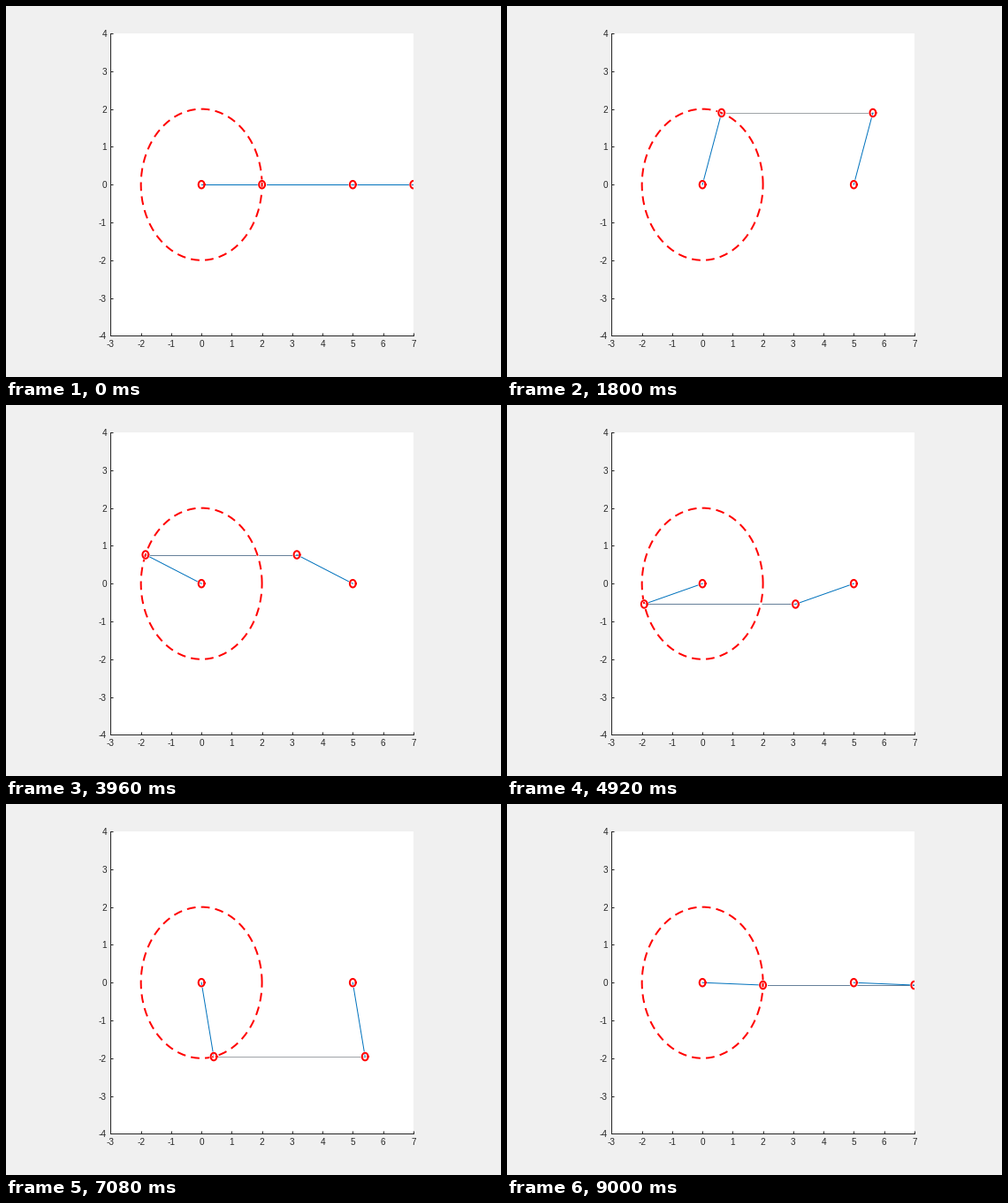
Recreate the animation shown at these times as a matplotlib script. Size 560x420 px, loop 9120 ms.

```python
import numpy as np
import matplotlib.pyplot as plt
from matplotlib.animation import FuncAnimation

W, H = 560, 420
PX = 0.72                     # points per pixel at 100 dpi
FRAMES, INTERVAL = 76, 120
STEP = 1 / 12                 # crank angle per frame, radians
CRANK, BASE, JOINT = 2, 5, 0.1
BLUE, STEEL, GRAY = "#0072bd", "#66809a", "#a0a4a8"
INK = "#262626"

plt.rcParams.update({
    "font.family": "Liberation Sans",
    "font.size": 10 * PX,
    "axes.unicode_minus": False,
    "toolbar": "None",
})

fig = plt.figure(figsize=(W / 100, H / 100), dpi=100, facecolor="#f0f0f0")
left, bottom, side = 118.4, 46.6, 342.4
ax = fig.add_axes([left / W, bottom / H, side / W, side / H])
ax.set(xlim=(-3, 7), ylim=(-4, 4), xticks=range(-3, 8), yticks=range(-4, 5))
ax.set_xticklabels([str(v) for v in range(-3, 8)])
ax.set_yticklabels([str(v) for v in range(-4, 5)])
ax.tick_params(direction="in", length=3.4 * PX, width=PX, color=INK,
               labelcolor=INK)
ax.tick_params(axis="x", pad=5 * PX)
ax.tick_params(axis="y", pad=4.5 * PX)
for name, spine in ax.spines.items():
    spine.set(linewidth=PX, color=INK, visible=name in ("left", "bottom"))

turn = np.linspace(0, 2 * np.pi, 181)


def ring_points(x, y, r):
    return x + r * np.cos(turn), y + r * np.sin(turn)


def ring(x, y, r, z, style="-"):
    """Red circle on a slightly wider white one."""
    pts = ring_points(x, y, r)
    back, = ax.plot(*pts, color="white", lw=3 * PX, zorder=z)
    front, = ax.plot(*pts, color="red", lw=2 * PX, ls=style, zorder=z + 0.1,
                     dash_capstyle="butt")
    return back, front


def link():
    return ax.plot([], [], color=BLUE, lw=PX, zorder=2)[0]


crank, coupler, rocker = link(), link(), link()
# Agg rounds dashes to whole pixels plus a half: 9.5 on, 6.5 off
ring(0, 0, CRANK, 3, (0, (4.9, 3.1)))
ring(0, 0, JOINT, 4)
ring(BASE, 0, JOINT, 4)
pins = [ring(CRANK, 0, JOINT, 4), ring(CRANK + BASE, 0, JOINT, 4)]


def coupler_color(x, y):
    if y == 0:
        return BLUE
    return GRAY if x > 0 and abs(y) > 0.6 else STEEL


def update(i):
    a = i * STEP
    x, y = CRANK * np.cos(a), CRANK * np.sin(a)
    crank.set_data([0, x], [0, y])
    coupler.set_data([x, x + BASE], [y, y])
    coupler.set_color(coupler_color(x, y))
    rocker.set_data([BASE, BASE + x], [0, y])
    for pin, px in zip(pins, (x, x + BASE)):
        for line in pin:
            line.set_data(*ring_points(px, y, JOINT))
    return crank, coupler, rocker


anim = FuncAnimation(fig, update, frames=FRAMES, interval=INTERVAL,
                     repeat=True, repeat_delay=0, blit=False)
plt.show()
```
